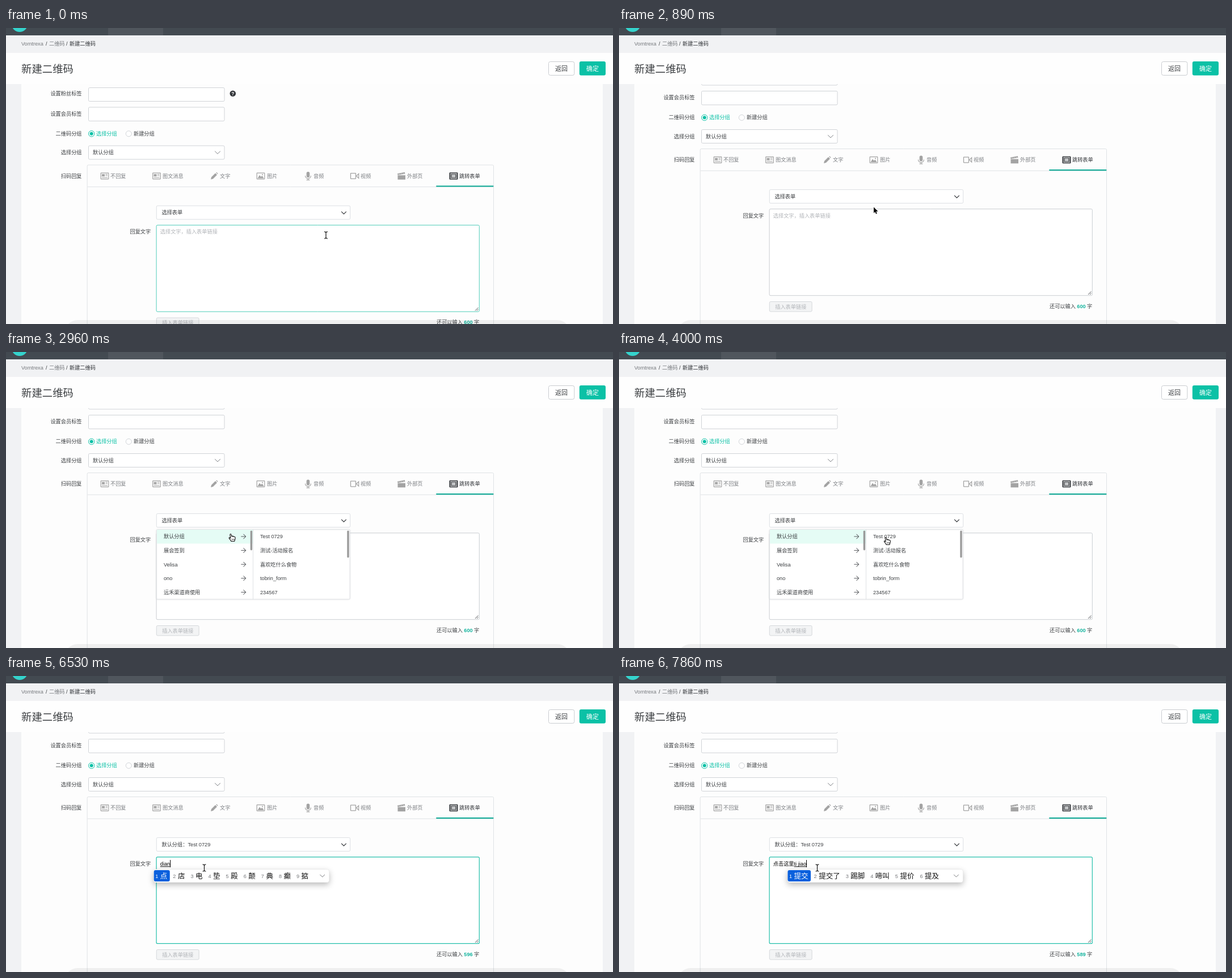
These frames come from a looping animation (1070x523 px, 8 s). An HTML page with a canvas:

```html
<!DOCTYPE html>
<html lang="zh-CN">
<head>
<meta charset="utf-8">
<title>新建二维码</title>
<style>
html, body { margin: 0; width: 100%; height: 100%; overflow: hidden; background: #fff; }
canvas { display: block; width: 1070px; height: 523px; }
</style>
</head>
<body>
<canvas id="stage"></canvas>
<script>
const W = 1070, H = 523, LOOP = 8000, STEP = 148, LAST = 53;
const FONT = '"Liberation Sans", "Noto Sans CJK SC", "Noto Sans CJK", sans-serif';
const TEAL = '#0bc1a6', INK = '#3c3f42', DARK = '#33363a', GREY = '#a3a3a3', LINE = '#d0d3d7', PALE = '#f1f2f4';
const canvas = document.getElementById('stage');
const ctx = canvas.getContext('2d');
const ratio = window.devicePixelRatio || 1;
canvas.width = W * ratio;
canvas.height = H * ratio;

// Pointer centre: step, x, y
const PATH = [
  [0, 564, 366], [6, 452, 322], [8, 404, 302], [10, 394, 298], [13, 394, 298],
  [15, 376, 323], [17, 374, 326], [19, 374, 326], [23, 473, 334], [30, 473, 334], [32, 349.5, 339]
];
const GROUPS = ['默认分组', '展会签到', 'Velisa', 'ono', '远禾渠道商使用'];
const FORMS = ['Test 0729', '测试-活动报名', '喜欢吃什么食物', 'tobrin_form', '234567'];
// Typing: first step, committed text, composing text, candidates
const TYPING = [
  [40, '', '', ''],
  [41, '', 'd', '的 都 大 到 点 对 多 等 但'],
  [42, '', 'di', '第 地 底 低 敌 滴 弟 递 帝'],
  [43, '', 'dia', '嗲 点 店 电 调 掉 钓 吊 叼'],
  [44, '', 'dian', '点 店 电 垫 殿 颠 典 癫 掂'],
  [45, '', 'dian ji', '点击 典籍 电机 电击 店家 点'],
  [46, '', 'dian ji z', '点击在 点击这 点击 典籍 点'],
  [47, '', 'dian ji zhe', '点击这 点击着 点击 典籍 点'],
  [48, '', 'dian ji zhe li', '点击这里 点击 典籍 电机 点'],
  [49, '点击这里', '', ''],
  [51, '点击这里', 't', '他 她 它 天 同 太 听 条 通'],
  [52, '点击这里', 'ti j', '提交 提及 体检 提价 体积 提'],
  [53, '点击这里', 'ti jiao', '提交 提交了 踢脚 啼叫 提价 提及']
];

function text(str, x, cy, color = INK, size = 9.2, weight = 400, align = 'left') {
  ctx.font = `${weight} ${size}px ${FONT}`;
  ctx.fillStyle = color;
  ctx.textAlign = align;
  ctx.fillText(str, x, cy + size * 0.37);
  return ctx.measureText(str).width;
}

function rect(x, y, w, h, color) {
  ctx.fillStyle = color;
  ctx.fillRect(x, y, w, h);
}

function paint(fill, stroke, lw) {
  if (fill) { ctx.fillStyle = fill; ctx.fill(); }
  if (stroke) { ctx.strokeStyle = stroke; ctx.lineWidth = lw; ctx.stroke(); }
}

function box(x, y, w, h, r, fill, stroke, lw = 1) {
  ctx.beginPath();
  ctx.roundRect(x, y, w, h, r);
  paint(fill, stroke, lw);
}

function line(pts, color, lw = 1) {
  ctx.beginPath();
  for (let i = 0; i < pts.length; i += 2) ctx.lineTo(pts[i], pts[i + 1]);
  paint(null, color, lw);
}

function poly(pts, fill, stroke, lw = 1) {
  ctx.beginPath();
  for (let i = 0; i < pts.length; i += 2) ctx.lineTo(pts[i], pts[i + 1]);
  ctx.closePath();
  paint(null, stroke, lw);
  paint(fill);
}

function disc(x, y, r, fill, stroke, lw = 1) {
  ctx.beginPath();
  ctx.arc(x, y, r, 0, Math.PI * 2);
  paint(fill, stroke, lw);
}

const chevron = (x, y, w, color, lw) => line([x - w, y - w / 2, x, y + w / 2, x + w, y - w / 2], color, lw);

// Tab icons, drawn around their own centre
const ICONS = {
  news() {
    box(-6.8, -5.3, 13.6, 10.6, 0.5, null, GREY, 1.2);
    rect(-5, -3.3, 5, 4, GREY);
    for (const y of [-3, -0.7]) line([1.3, y, 5, y], GREY);
    line([-5, 2.7, 5, 2.7], GREY);
  },
  pencil() {
    poly([-6, 6, -5, 2, 2, -5, 5, -2, -2, 5], GREY);
    poly([3, -6, 4.4, -6.4, 6.4, -4.4, 6, -3], GREY);
  },
  picture() {
    box(-6.8, -5.3, 13.6, 10.6, 0.5, null, GREY, 1.2);
    poly([-5.5, 4, -2, -1.5, 0.5, 1.5, 2.5, -0.5, 5.5, 4], GREY);
    disc(3, -2.5, 1.1, GREY);
  },
  mic() {
    box(-2.8, -7.5, 5.6, 10, 2.8, GREY);
    ctx.beginPath();
    ctx.arc(0, -0.5, 5, 0, Math.PI);
    paint(null, GREY, 1.1);
    line([0, 4.5, 0, 7], GREY, 1.2);
    line([-3, 7, 3, 7], GREY, 1.2);
  },
  video() {
    box(-7, -4.8, 9, 9.6, 0.5, null, GREY, 1.3);
    poly([3.2, 0, 7.2, -4, 7.2, 4], null, GREY, 1.2);
  },
  clapper() {
    rect(-6.5, -1.5, 13.5, 7.8, GREY);
    poly([-7, -4.2, 5.8, -6.8, 6.5, -4, -6.4, -1.8], GREY);
    for (const x of [-4, 0, 4]) line([x - 1, -5.5, x + 0.6, -2.8], '#ddd', 0.6);
    line([-6.5, -1.4, 7, -1.4], '#ddd', 0.6);
  },
  form() {
    box(-6.7, -5.5, 13.4, 11, 0.5, null, DARK, 1.6);
    box(-3.8, -3.2, 7.6, 6.4, 0, '#c4c6c8', DARK, 1.1);
    for (const x of [-5.2, 5.2]) line([x, -4, x, 4], DARK, 0.8);
  }
};
const TABS = [
  ['news', 174, '不回复', 184], ['news', 265.5, '图文消息', 276], ['pencil', 367, '文字', 377],
  ['picture', 449, '图片', 460], ['mic', 532.5, '音频', 542], ['video', 614.5, '视频', 625],
  ['clapper', 697, '外部页', 707], ['form', 789, '跳转表单', 799]
];

function header() {
  rect(0, 0, W, 13, '#434a51');
  rect(180, 0, 97, 13, '#50565d');
  ctx.save();
  ctx.beginPath();
  ctx.rect(0, 0, W, 13);
  ctx.clip();
  disc(24, -7, 14, '#35d3cc');
  ctx.restore();
  rect(0, 13, W, 31, PALE);
  text('Vomtrexa', 27, 28, '#76797d');
  text('/', 70, 28);
  text('二维码', 76, 28, '#76797d');
  text('/', 106, 28);
  text('新建二维码', 112, 28, '#2c2f33', 9.2, 500);
  rect(0, 44, W, 55, '#fefefe');
  text('新建二维码', 27, 72, INK, 18.4);
  box(956.5, 59.5, 45.3, 24, 3, '#fff', '#c9ccd0');
  text('返回', 979, 71.5, INK, 11, 400, 'center');
  box(1010.8, 59.1, 46.2, 24.6, 3, TEAL);
  text('确定', 1034, 71.5, '#fff', 11, 500, 'center');
}

function formTop() {
  const label = (str, cy) => text(str, 133.5, cy, INK, 9.2, 400, 'right');
  label('设置粉丝标签', 87.5);
  box(145.5, 77, 239.5, 24, 2, '#fff', LINE);
  disc(399.8, 87.3, 5.3, DARK);
  text('?', 399.8, 87.4, '#fff', 8.5, 700, 'center');
  label('设置会员标签', 123);
  box(145.5, 111.5, 239.5, 24.3, 2, '#fff', LINE);
  label('二维码分组', 157.8);
  disc(150.7, 158.3, 5.2, '#fff', TEAL);
  disc(150.7, 158.3, 3, TEAL);
  text('选择分组', 159, 157.8, TEAL);
  disc(216.3, 158.3, 5, '#fff', LINE);
  text('新建分组', 225, 157.8);
  label('选择分组', 191.5);
  box(145.5, 179.5, 239.5, 24, 2, '#fff', LINE);
  text('默认分组', 153, 191.5);
  chevron(373, 191.5, 4.8, '#7d8084', 1);
  label('扫码回复', 233);
}

function panel() {
  box(143.2, 213.5, 716.3, 400, 2, '#fdfdfd', '#dfe2e5');
  line([143.5, 252.2, 859.5, 252.2], '#dfe2e5');
  for (const [icon, x, name, tx] of TABS) {
    ctx.save();
    ctx.translate(x, 233);
    ICONS[icon]();
    ctx.restore();
    text(name, tx, 233, icon === 'form' ? DARK : '#7c7f83');
  }
  rect(758.3, 250, 101, 2.1, '#13ab97');
}

function replyForm(s, typed) {
  const picked = s >= 28;
  box(265.3, 285.6, 341.4, 24, 2, '#fff', s >= 13 && s < 17 ? '#35c7b1' : '#dcdfe3');
  text(picked ? '默认分组：Test 0729' : '选择表单', 274.5, 297.5);
  chevron(595.5, 298, 4.3, DARK, 1.2);

  text('回复文字', 218.5, 331.5);
  const focus = s >= 34, hover = s <= 5 || s >= 29;
  box(265.1, 319.8, 569.2, 152.9, 2, '#fff', focus ? '#22bfaa' : hover ? '#4fcdb9' : '#c9cdd1', focus ? 1.2 : 1);
  line([827, 471, 832.5, 465.5], '#55585c');
  line([830, 471, 832.5, 468.5], '#55585c');

  const count = typed ? typed[1].length + typed[2].length : 0;
  if (!count) text('选择文字，插入表单链接', 271.8, 331.5, '#b2b5b9');
  box(265.3, 483.5, 74.8, 17.5, 2, '#f3f4f5', '#d5d8db');
  text('插入表单链接', 302.8, 492.5, '#b2b5b9', 9.2, 400, 'center');
  text('还可以输入', 759, 491.5);
  text(String(600 - count), 807.3, 491.5, '#17b59f', 9.2, 700);
  text('字', 825, 491.5);
}

function listArrow(x, y) {
  line([x - 4.2, y, x + 4, y], '#55585c');
  line([x, y - 4.2, x + 4.2, y, x, y + 4.2], DARK);
}

function dropdown(s) {
  const loaded = s >= 19, rowY = i => 326 + i * 24.6;
  ctx.save();
  ctx.shadowColor = 'rgba(0,0,0,.08)';
  ctx.shadowBlur = 3 * ratio;
  box(265.3, 313.7, 341, 123.3, 2, '#fff', '#dfe2e5');
  ctx.restore();
  if (loaded) rect(266, 314, 169, 24.5, '#e5fcf5');
  line([435.5, 314, 435.5, 437], '#dfe2e5');
  GROUPS.forEach((name, i) => {
    text(name, 278, rowY(i));
    listArrow(418.5, rowY(i));
  });
  box(430.7, 315.5, 3.4, 35, 1.7, '#9a9a9a');
  if (loaded) {
    FORMS.forEach((name, i) => text(name, 448, rowY(i)));
    box(601.3, 315.5, 3.4, 48, 1.7, '#9a9a9a');
  } else {
    text('暂无表单可选', 448, rowY(0));
  }
}

function candidates(x, words) {
  ctx.save();
  ctx.shadowColor = 'rgba(0,0,0,.28)';
  ctx.shadowBlur = 11 * ratio;
  ctx.shadowOffsetY = 4 * ratio;
  box(x, 341.5, 309.5, 23.3, 4, '#fff');
  ctx.restore();
  box(x, 341.5, 309.5, 23.3, 4, '#fff', 'rgba(0,0,0,.1)', 0.6);
  let cx = x + 3.8;
  words.forEach((word, i) => {
    const w = word.length * 12.5, on = i === 0;
    if (on) box(cx - 3.3, 343, w + 15.6, 20, 3, '#0a60dd');
    text(String(i + 1), cx - 0.8, 353.3, on ? '#fff' : '#77797c', 9.2);
    text(word, cx + 7.8, 353, on ? '#fff' : '#111', 12.5, 500);
    cx += w + 18.6;
  });
  chevron(x + 297.5, 353, 4.3, '#77797c', 1);
}

function typing(s, typed) {
  if (!typed) {
    if (s >= 34 && s < 37) rect(271, 325, 1, 13, '#000');
    return;
  }
  const [, done, draft, words] = typed;
  const start = 271.8 + text(done, 271.8, 331.5, '#000');
  const end = start + text(draft, start, 331.5, '#000');
  if (draft) {
    rect(start, 336.3, end - start, 1, '#000');
    candidates(start - 11.6, words.split(' '));
  }
  rect(draft || done ? end : 271, 325, 1, 13, '#000');
}

function pointer(s) {
  let i = 0;
  while (i < PATH.length - 2 && s >= PATH[i + 1][0]) i++;
  const [s0, x0, y0] = PATH[i], [s1, x1, y1] = PATH[i + 1];
  const k = Math.min(1, (s - s0) / (s1 - s0));
  ctx.save();
  ctx.translate(x0 + (x1 - x0) * k, y0 + (y1 - y0) * k);
  ctx.lineJoin = 'round';
  if (s <= 5 || s >= 31) beam();
  else if (s === 6) arrow();
  else hand();
  ctx.restore();
}

function beam() {
  for (const [color, lw] of [['#fff', 2.6], ['#111', 1.2]]) {
    line([0, -5, 0, 5], color, lw);
    for (const d of [-1, 1]) line([-3, 6 * d, -1.2, 5.8 * d, 0, 4.8 * d, 1.2, 5.8 * d, 3, 6 * d], color, lw);
  }
}

function arrow() {
  poly([-3, -5.5, -3, 5, -0.6, 2.8, 1, 6.5, 2.8, 5.7, 1.2, 2.2, 4.5, 2], '#000', '#fff', 1.8);
}

function hand() {
  ctx.beginPath();
  ctx.moveTo(-1.8, 6.5);
  ctx.bezierCurveTo(-2.5, 4, -5.8, 2, -5.6, 0.3);
  ctx.bezierCurveTo(-5.2, -0.9, -3.8, 0.2, -2.8, 1.2);
  ctx.lineTo(-3.9, -4.8);
  ctx.bezierCurveTo(-4, -6.8, -2, -7, -1.7, -5.2);
  ctx.lineTo(-1, -2);
  ctx.bezierCurveTo(-0.2, -3.3, 1, -3, 1.2, -1.8);
  ctx.bezierCurveTo(2, -2.8, 3.2, -2.4, 3.4, -1.2);
  ctx.bezierCurveTo(4.3, -2, 5.4, -1.3, 5.4, 0);
  ctx.bezierCurveTo(5.6, 2.8, 4.3, 4, 4, 6.5);
  ctx.closePath();
  paint('#fff', '#111', 1.1);
  for (const x of [-0.4, 1.5, 3.3]) line([x, 2, x + 0.1, 4.6], '#111', 0.7);
}

function draw(time) {
  const s = Math.min(LAST, Math.floor((time % LOOP) / STEP));
  const typed = TYPING.filter(row => row[0] <= s).pop();
  const left = 1 - Math.min(1, s / 4);
  const scroll = 28.5 * left * left * (3 - 2 * left);
  ctx.setTransform(ratio, 0, 0, ratio, 0, 0);
  rect(0, 0, W, H, PALE);
  rect(27, 99, 1025, H - 99, '#fdfdfd');
  ctx.save();
  ctx.beginPath();
  ctx.rect(0, 99, W, H - 99);
  ctx.clip();
  ctx.translate(0, scroll);
  formTop();
  panel();
  replyForm(s, typed);
  ctx.restore();
  box(104, 516, 890, 60, 22, 'rgba(0,0,0,.055)');
  header();
  if (s >= 13 && s < 28) dropdown(s);
  typing(s, typed);
  pointer(s);
}

function loop(now) {
  draw(now);
  requestAnimationFrame(loop);
}
draw(0);
requestAnimationFrame(loop);
</script>
</body>
</html>
```
